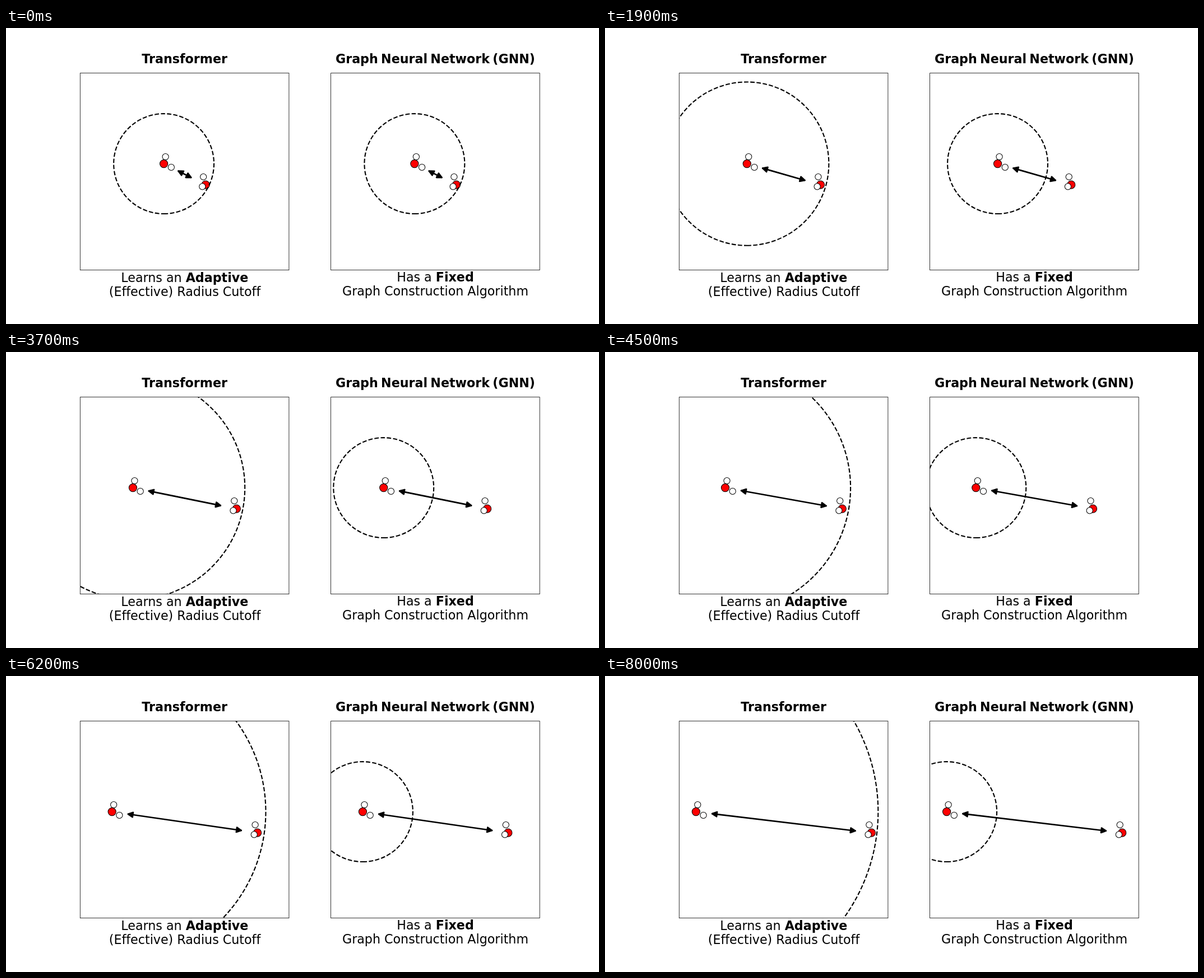
An HTML page with a canvas that plays this animation: 1058x529 px, repeating every 10 s.

```html
<!DOCTYPE html>
<html lang="en">
<head>
<meta charset="utf-8">
<title>Adaptive and fixed cutoff</title>
<style>
  html, body { margin: 0; width: 100%; height: 100%; overflow: hidden; background: #fff; }
  canvas, svg { position: absolute; left: 0; top: 0; width: 1058px; height: 529px; }
  text {
    font: 22.2px "DejaVu Sans", sans-serif;
    font-variant-ligatures: none;
    text-anchor: middle;
  }
  .bold { font-weight: bold; }
  .title { font-weight: bold; word-spacing: -2.4px; }
</style>
</head>
<body>
<canvas id="stage" width="1058" height="529"></canvas>
<svg viewBox="0 0 1058 529">
  <text class="title" x="318.6" y="62.7">Transformer</text>
  <text class="title" x="766" y="62.7">Graph Neural Network (GNN)</text>
  <text x="318.8" y="454">Learns an <tspan class="bold">Adaptive</tspan></text>
  <text x="319" y="479.4">(Effective) Radius Cutoff</text>
  <text x="766" y="453">Has a <tspan class="bold">Fixed</tspan></text>
  <text x="766" y="478.2">Graph Construction Algorithm</text>
</svg>
<script>
const ctx = document.getElementById('stage').getContext('2d');

const LOOP = 10000, STEP = 100, LAST = 80;
const UNIT = 74.54;              // pixels per data unit
const PT = 1.0496;               // pixels per point
const BOX = { y: 80.6, w: 372.6, h: 352 };
const PANELS = [{ x: 132.3, adaptive: true }, { x: 579.6, adaptive: false }];
const Y1 = 242.6, Y2 = 280.2;

function disc(x, y, r, fill) {
  ctx.beginPath();
  ctx.arc(x, y, r, 0, 2 * Math.PI);
  ctx.fillStyle = fill;
  ctx.fill();
  ctx.lineWidth = PT;
  ctx.stroke();
}

function molecule(x, y, hydrogens) {
  disc(x, y, 7.1, '#f00');
  for (const [dx, dy] of hydrogens) disc(x + dx, y + dy, 5.6, '#fff');
}

function cutoff(x, y, r) {
  const lw = 2 * PT;
  ctx.lineWidth = lw;
  ctx.setLineDash([3.7 * lw, 1.6 * lw]);
  ctx.beginPath();
  ctx.arc(x, y, r, Math.PI / 2, -1.5 * Math.PI, true);
  ctx.stroke();
  ctx.setLineDash([]);
}

// Double-headed arrow between two points, held clear of both ends.
function arrow(x1, y1, x2, y2) {
  const len = Math.hypot(x2 - x1, y2 - y1);
  const gap = 29.1, head = 8 * PT, half = 4 * PT;
  ctx.save();
  ctx.translate(x1, y1);
  ctx.rotate(Math.atan2(y2 - y1, x2 - x1));
  ctx.lineWidth = 2.7;
  ctx.lineCap = ctx.lineJoin = 'round';
  ctx.fillStyle = '#000';
  ctx.beginPath();
  ctx.moveTo(gap, 0);
  ctx.lineTo(len - gap, 0);
  ctx.stroke();
  for (const [tip, dir] of [[gap, 1], [len - gap, -1]]) {
    ctx.beginPath();
    ctx.moveTo(tip, 0);
    ctx.lineTo(tip + dir * head, half);
    ctx.lineTo(tip + dir * head, -half);
    ctx.closePath();
    ctx.fill();
    ctx.stroke();
  }
  ctx.restore();
}

function panel({ x, adaptive }, step) {
  const shift = 0.02 * step * UNIT;
  const x1 = x + 2 * UNIT + 0.2 - shift;
  const x2 = x + 3 * UNIT + 0.2 + shift;
  // The adaptive radius stops growing one step before the molecules stop.
  const growth = adaptive ? 0.04 * Math.min(step, LAST - 1) : 0;

  ctx.strokeStyle = '#000';
  ctx.save();
  ctx.beginPath();
  ctx.rect(x, BOX.y, BOX.w, BOX.h);
  ctx.clip();
  molecule(x1, Y1, [[3, -12.5], [13.2, 6.3]]);
  molecule(x2, Y2, [[-4, -14.2], [-5.8, 3.1]]);
  cutoff(x1, Y1, (1.2 + growth) * UNIT);
  arrow(x1, Y1, x2, Y2);
  ctx.restore();

  ctx.lineWidth = 0.8;
  ctx.strokeRect(x, BOX.y, BOX.w, BOX.h);
}

function draw(now) {
  const step = Math.min(LAST, Math.floor((now % LOOP) / STEP));
  ctx.fillStyle = '#fff';
  ctx.fillRect(0, 0, 1058, 529);
  for (const p of PANELS) panel(p, step);
}

function tick() {
  draw(performance.now());
  requestAnimationFrame(tick);
}
tick();
</script>
</body>
</html>
```
